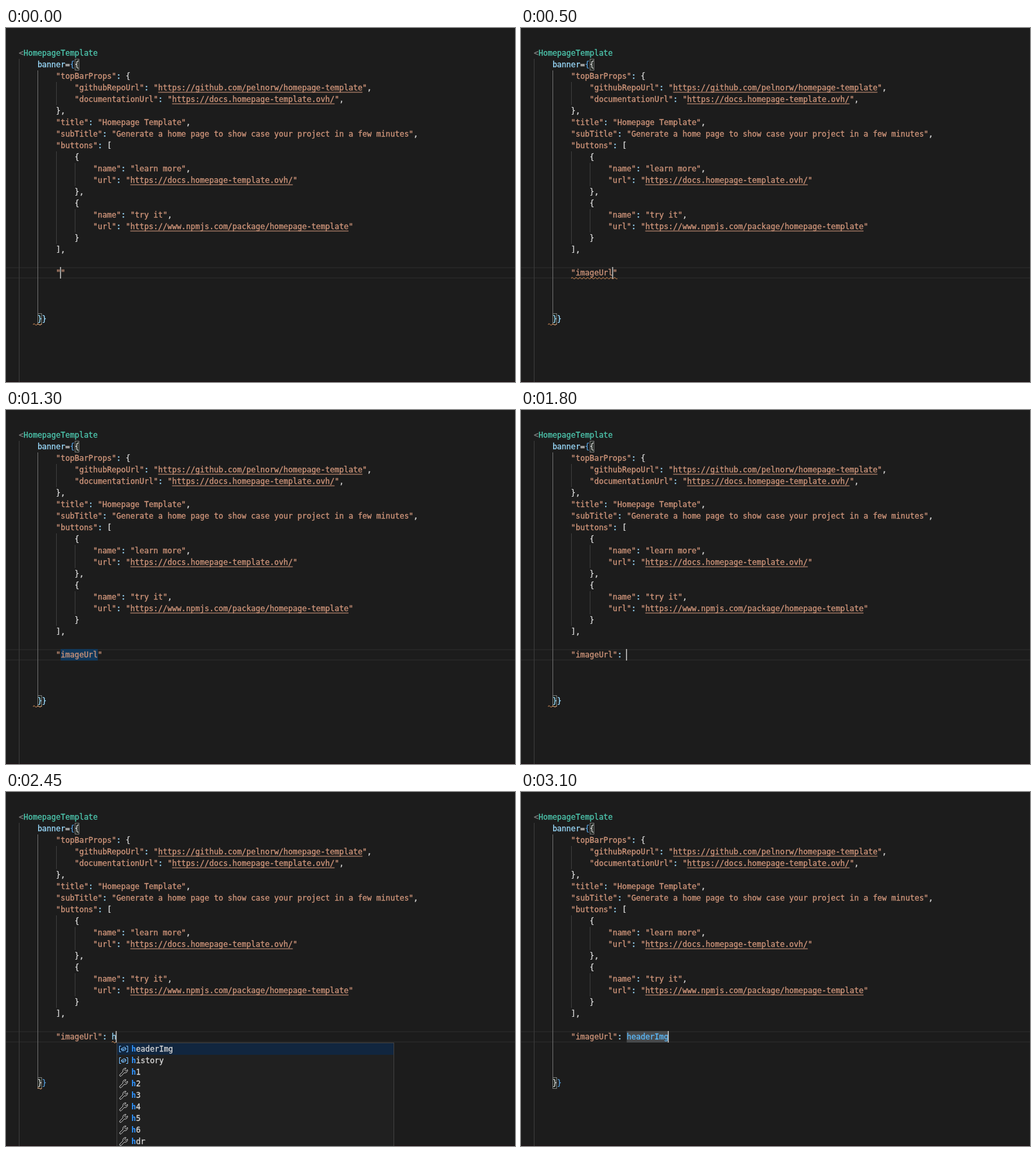
An HTML page with a canvas that plays this animation: 792x551 px, repeating every 3800 ms.

```html
<!DOCTYPE html>
<html lang="en">
<head>
<meta charset="utf-8">
<title>Code completion</title>
<style>
  html, body { margin: 0; width: 100%; height: 100%; overflow: hidden; background: #1c1c1c; }
  canvas { display: block; }
</style>
</head>
<body>
<canvas id="stage" width="792" height="551"></canvas>
<script>
const ctx = document.getElementById('stage').getContext('2d');
const LOOP = 3800, LEFT = 20, TOP = 30, LINE = 18, CHAR = 7.2246;
const FONT = '12px "DejaVu Sans Mono", monospace';
const COLOR = {
  back: '#1c1c1c', plain: '#dadada', string: '#d2977c', name: '#9cdcfe', constant: '#5cbcff',
  brace: '#569cd6', tag: '#4ec9b0', guide: '#3c3c3c', activeGuide: '#6e6e6e',
  icon: '#75beff', match: '#2f94ff', squiggle: '#d18a55', lineEdge: '#252525'
};
const EDIT_ROW = 19, END_ROW = 23;

const source = `
        "topBarProps": {
            "githubRepoUrl": "https://github.com/pelnorw/homepage-template",
            "documentationUrl": "https://docs.homepage-template.ovh/",
        },
        "title": "Homepage Template",
        "subTitle": "Generate a home page to show case your project in a few minutes",
        "buttons": [
            {
                "name": "learn more",
                "url": "https://docs.homepage-template.ovh/"
            },
            {
                "name": "try it",
                "url": "https://www.npmjs.com/package/homepage-template"
            }
        ],`.split('\n');

const properties = ['background?', 'buttons?', 'imageUrl?', 'paragraphMd?', 'subTitle', 'title', 'topBarProps?'];
const completions = ['headerImg', 'history', 'h1', 'h2', 'h3', 'h4', 'h5', 'h6', 'hdr'];

// Each edit holds the text and the caret column from its start time on.
const edits = [
  [0, '""', 9],
  [400, '"imageUrl"', 17],
  [1650, '"imageUrl":', 19],
  [1800, '"imageUrl": ', 20],
  [2000, '"imageUrl": h', 21],
  [2500, '"imageUrl": headerImg', 29]
];

const colX = col => LEFT + col * CHAR;
const rowY = row => TOP + row * LINE;
const within = (t, from, to) => t >= from && t < to;

function rect(x, y, w, h, color) {
  ctx.fillStyle = color;
  ctx.fillRect(x, y, w, h);
}

function frame(x, y, w, h, color) {
  ctx.strokeStyle = color;
  ctx.lineWidth = 1;
  ctx.strokeRect(x + .5, y + .5, w - 1, h - 1);
}

function path(d, x, y, color, width = 1) {
  ctx.save();
  ctx.translate(x, y);
  ctx.strokeStyle = color;
  ctx.lineWidth = width;
  ctx.lineJoin = 'round';
  ctx.stroke(new Path2D(d));
  ctx.restore();
}

// A thin outline gives the glyphs their slightly heavier weight.
function text(str, x, y, color, bold = false) {
  ctx.font = (bold ? 'bold ' : '') + FONT;
  ctx.fillStyle = ctx.strokeStyle = color;
  ctx.lineWidth = .3;
  ctx.fillText(str, x, y + 13);
  if (!bold) ctx.strokeText(str, x, y + 13);
}

const put = (str, col, row, color) => text(str, colX(col), rowY(row), color);

function codeLine(line, row, nameColor = COLOR.name) {
  for (const { 0: token, index } of line.matchAll(/"[^"]*"|:|\w+|[^\s\w":]+/g)) {
    const color = token[0] === '"' ? COLOR.string
      : token === ':' ? COLOR.name
      : /\w/.test(token) ? nameColor : COLOR.plain;
    put(token, index, row, color);
  }
  const link = line.match(/https:[^"]+/);
  if (link) rect(colX(link.index), rowY(row) + 15.5, link[0].length * CHAR, 1, COLOR.string);
}

function guide(col, fromRow, toRow, color = COLOR.guide) {
  rect(Math.round(colX(col)), rowY(fromRow), 1, (toRow - fromRow) * LINE, color);
}

function highlight(col, length, color) {
  rect(colX(col), rowY(EDIT_ROW), length * CHAR, LINE, color);
}

function squiggle(x, row, width) {
  const y = rowY(row) + 15;
  ctx.save();
  ctx.beginPath();
  ctx.rect(x, y, width, 4);
  ctx.clip();
  let d = 'M0 2.5';
  for (let i = 0; i < width; i += 6) d += 'l1.5 -2l3 2.6l1.5 -.6';
  path(d, x, y + .5, COLOR.squiggle);
  ctx.restore();
}

function bracketBox(col, row) {
  const x = Math.round(colX(col));
  rect(x, rowY(row), 7, LINE, '#1b211b');
  frame(x, rowY(row), 7, LINE, '#787878');
}

function cubeIcon(x, y) {
  path('M-6.5 -2L1 -5.5L6.5 -2.5V2.5L-1 6L-6.5 3ZM-6.5 -2L-1 1L6.5 -2.5M-1 1V6', x, y, COLOR.icon);
}

function variableIcon(x, y) {
  path('M-4 -4.5H-6.5V4.5H-4M4 -4.5H6.5V4.5H4M-3.5 -.5L1 -3L3.5 -1.5V1L-1 3L-3.5 1.5ZM-3.5 -.5L-1 .7L3.5 -1.5M-1 .7V3',
    x, y, COLOR.icon);
}

function wrenchIcon(x, y) {
  path('M4 -6A4 4 0 0 0 -1 -1L-6 4A1.6 1.6 0 0 0 -4 6.3L1 1A4 4 0 0 0 6 -4L3.5 -1.5L1.5 -3.5Z', x, y, '#c5c5c5');
}

function popup(x, height, items, selected, drawItem) {
  const y = 390;
  rect(x, y, 432, height, '#202020');
  frame(x, y, 432, height, '#414141');
  rect(x + 1, y + 1 + selected * LINE, 430, LINE, '#11263f');
  items.forEach((item, i) => drawItem(item, i, x + 23, y + 1 + i * LINE));
}

function propertyPopup(t) {
  popup(85, 130, properties, 2, (item, i, x, y) => {
    cubeIcon(x - 12, y + 9);
    text(item, x, y, COLOR.plain);
    if (i === 2 && t >= 100) text('(property) imageUrl?: string | undefi…', 227, y, '#949eaa');
  });
}

function completionPopup() {
  popup(172, 180, completions, 0, (item, i, x, y) => {
    (i < 2 ? variableIcon : wrenchIcon)(x - 12, y + 9);
    text(item[0], x, y, COLOR.match, true);
    text(item.slice(1), x + CHAR, y, COLOR.plain);
  });
}

function caretAlpha(t) {
  if (!within(t, 850, 1400)) return 1;
  return t < 1100 ? Math.max(0, 1 - (t - 800) / 250) : Math.max(0, (t - 1300) / 100);
}

function draw(t) {
  const [, line, caret] = edits.findLast(edit => t >= edit[0]);
  const valid = t >= 2000;

  rect(0, 0, 792, 551, COLOR.back);
  rect(0, 550, 792, 1, '#1d1013');
  rect(0, rowY(EDIT_ROW), 792, 2, COLOR.lineEdge);
  rect(0, rowY(EDIT_ROW + 1) - 2, 792, 2, COLOR.lineEdge);

  guide(0, 1, 29);
  guide(4, 2, END_ROW, COLOR.activeGuide);
  guide(8, 3, 5);
  guide(8, 9, 17);
  guide(12, 10, 12);
  guide(12, 14, 16);
  bracketBox(12, 1);
  bracketBox(4, END_ROW);

  put('<', 0, 0, '#808080');
  put('HomepageTemplate', 1, 0, COLOR.tag);
  put('banner', 4, 1, COLOR.name);
  put('=', 10, 1, COLOR.plain);
  put('{', 11, 1, COLOR.brace);
  put('{', 12, 1, COLOR.plain);
  source.forEach((code, i) => codeLine(code, i + 1));
  put('}', 4, END_ROW, valid ? COLOR.plain : COLOR.name);
  put('}', 5, END_ROW, valid ? COLOR.brace : COLOR.name);

  if (within(t, 850, 1650)) highlight(9, 8, '#12385a');
  if (t >= 3000) highlight(20, 9, '#47494b');
  codeLine(' '.repeat(8) + line, EDIT_ROW, t >= 2850 ? COLOR.constant : COLOR.name);

  if (within(t, 500, 850)) squiggle(78, EDIT_ROW, 72);
  if (within(t, 2250, 2700)) squiggle(colX(20), EDIT_ROW, CHAR);
  if (!valid) squiggle(42, END_ROW, 14);
  else if (t < 2500) squiggle(49, END_ROW, 7);

  ctx.globalAlpha = caretAlpha(t);
  rect(colX(caret) - 1, rowY(EDIT_ROW), 1.5, LINE, '#c4c4c2');
  ctx.globalAlpha = 1;

  if (within(t, 50, 400)) propertyPopup(t);
  if (within(t, 2100, 2500)) completionPopup();
}

const start = performance.now();
function tick() {
  draw((performance.now() - start) % LOOP);
  requestAnimationFrame(tick);
}
tick();
</script>
</body>
</html>
```
